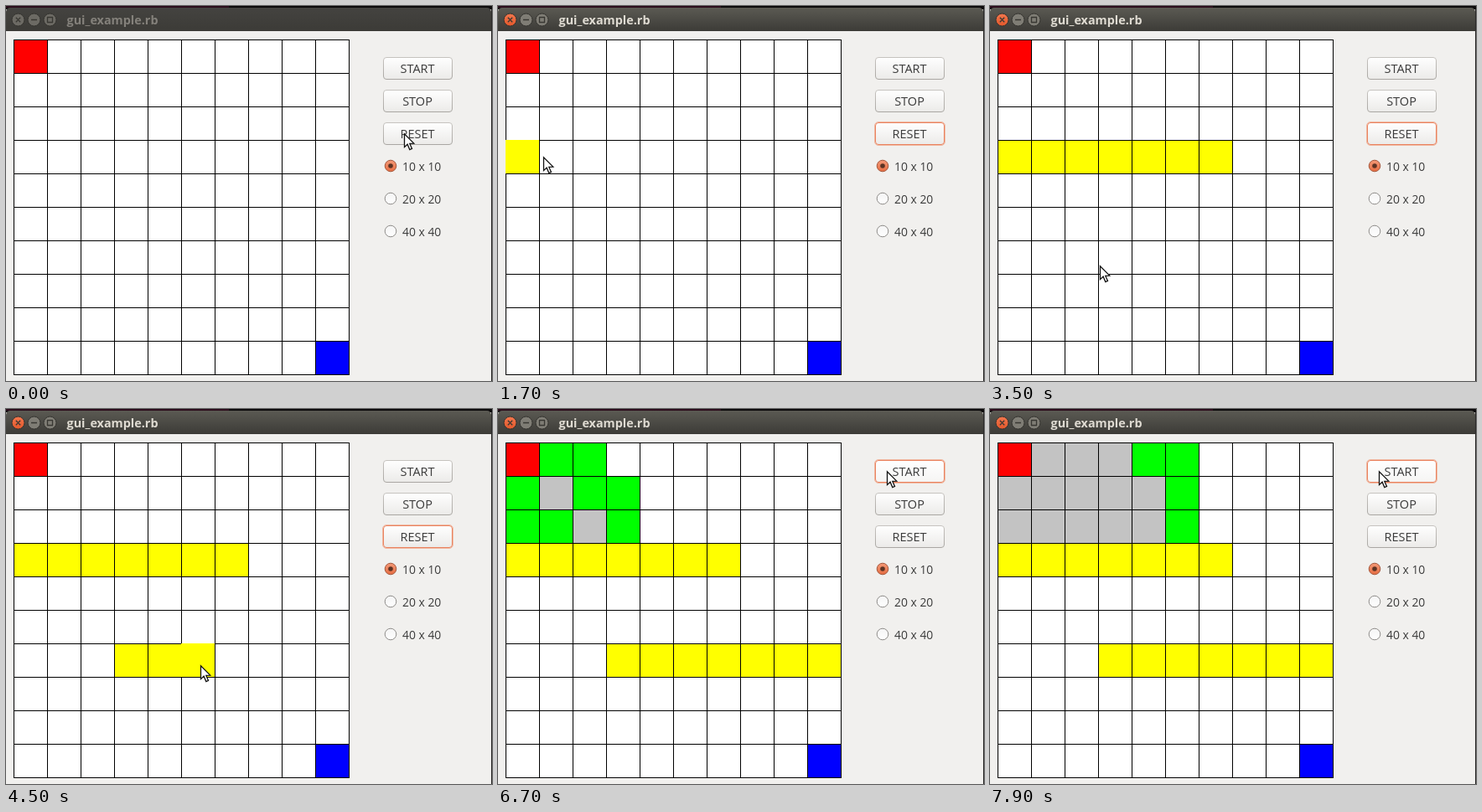
An HTML page with a canvas that plays this animation: 580 by 448 pixels, repeating every 8000 ms.

```html
<!DOCTYPE html>
<html lang="en">
<head>
<meta charset="utf-8">
<title>gui_example.rb</title>
<style>
html, body { margin: 0; width: 100%; height: 100%; overflow: hidden; background: #f1f0ee; }
canvas { display: block; }
</style>
</head>
<body>
<canvas id="stage" width="580" height="448"></canvas>
<script>
const ctx = document.getElementById('stage').getContext('2d');
const LOOP = 8000, STEP = 100;
const CELL = 40, LEFT = 9, TOP = 40, SIZE = 10, GOAL = SIZE * SIZE - 1;
const LAG = 40;
const PRESS = 6500, RELEASE = 6600;
const VISIT_FROM = 6440, VISIT_TIME = 105, REPAINT = 200;
const FONT = '"Open Sans", "Noto Sans", sans-serif';
const INK = '#3b3b3b';

// Pointer way-points: time, x, y
const path = [
  [100, 475, 152], [400, 505, 148], [1000, 103, 203], [1500, 22, 182],
  [1700, 54, 180], [2200, 265, 187], [2600, 249, 265], [2800, 90, 349],
  [3500, 131, 310], [4100, 127, 310], [4500, 232, 306], [4900, 385, 299],
  [5300, 456, 299], [5800, 450, 160], [6200, 464, 74]
];

// Start and end of each wall-painting drag
const drags = [[1500, 2250], [4200, 5000]];
const ACTIVATE = drags[0][0];

function pointerAt(t) {
  const i = path.findIndex(p => p[0] > t);
  if (i === 0) return path[0].slice(1);
  if (i < 0) return path[path.length - 1].slice(1);
  const [t0, x0, y0] = path[i - 1], [t1, x1, y1] = path[i];
  const k = (t - t0) / (t1 - t0);
  return [Math.round(x0 + (x1 - x0) * k), Math.round(y0 + (y1 - y0) * k)];
}

const column = key => key % SIZE;
const row = key => Math.floor(key / SIZE);

function cellAt(t) {
  const [x, y] = pointerAt(t);
  return Math.floor((y - TOP) / CELL) * SIZE + Math.floor((x - LEFT) / CELL);
}

// Walls follow the dragging pointer; the newest one stays fresh until release
function paintedWalls(t) {
  const walls = new Set();
  let fresh = -1;
  for (const [from, to] of drags) {
    if (t < from) continue;
    const last = cellAt(Math.max(from, Math.min(t, to) - LAG));
    for (let key = cellAt(from); key <= last; key++) walls.add(key);
    if (t < to) fresh = last;
  }
  return { walls, fresh };
}

function distance(a, b) {
  const dx = Math.abs(column(a) - column(b)), dy = Math.abs(row(a) - row(b));
  return 10 * Math.max(dx, dy) + 4 * Math.min(dx, dy);
}

function neighbours(key) {
  const list = [];
  for (let x = column(key) - 1; x <= column(key) + 1; x++) {
    for (let y = row(key) - 1; y <= row(key) + 1; y++) {
      if (x >= 0 && y >= 0 && x < SIZE && y < SIZE) list.push(y * SIZE + x);
    }
  }
  return list;
}

// A* from the red cell; ties go to the cell found first
function search(visits, walls) {
  const open = new Map([[0, 0]]), closed = new Set();
  for (let n = 0; n <= visits && open.size; n++) {
    let best, bestCost = Infinity;
    for (const [key, g] of open) {
      const cost = g + distance(key, GOAL);
      if (cost < bestCost) [best, bestCost] = [key, cost];
    }
    const g = open.get(best);
    open.delete(best);
    closed.add(best);
    for (const key of neighbours(best)) {
      if (walls.has(key) || closed.has(key)) continue;
      const next = g + distance(best, key);
      if (!(open.get(key) <= next)) open.set(key, next);
    }
  }
  return { open: [...open.keys()], closed: [...closed] };
}

function rect(x, y, w, h, color) {
  ctx.fillStyle = color;
  ctx.fillRect(x, y, w, h);
}

function shade(y0, y1, ...colors) {
  const g = ctx.createLinearGradient(0, y0, 0, y1);
  colors.forEach((c, i) => g.addColorStop(i / (colors.length - 1), c));
  return g;
}

function stroke(color, width = 1) {
  ctx.strokeStyle = color;
  ctx.lineWidth = width;
  ctx.stroke();
}

function circle(x, y, r, fill, line) {
  ctx.beginPath();
  ctx.arc(x, y, r, 0, Math.PI * 2);
  ctx.fillStyle = fill;
  ctx.fill();
  if (line) stroke(line);
}

function text(str, x, y, font, color, align = 'left') {
  ctx.font = `${font} ${FONT}`;
  ctx.textAlign = align;
  ctx.fillStyle = color;
  ctx.fillText(str, x, y);
}

function drawTitle(active) {
  rect(0, 0, 580, 4, '#0c0a0b');
  rect(0, 0, 266, 2, '#2c0d1c');
  ctx.beginPath();
  ctx.roundRect(0, 2, 579, 28, [5, 5, 0, 0]);
  ctx.fillStyle = active ? shade(2, 30, '#5b5a53', '#3c3b37') : shade(2, 30, '#444340', '#3c3b37');
  ctx.fill();

  const grey = active ? '#7f7d75' : '#6c6a64';
  for (let i = 0; i < 3; i++) {
    const fill = active && i === 0 ? shade(9, 24, '#f2774e', '#e2582b') : grey;
    circle(14.5 + i * 19, 16.5, 7.5, fill, '#34332f');
  }
  ctx.beginPath();
  ctx.moveTo(11.8, 13.8); ctx.lineTo(17.2, 19.2);
  ctx.moveTo(17.2, 13.8); ctx.lineTo(11.8, 19.2);
  ctx.moveTo(30, 16.5); ctx.lineTo(37, 16.5);
  ctx.rect(49.5, 13.5, 6, 6);
  stroke('#383732', 1.3);
  text('gui_example.rb', 72.5, 22, 'bold 14.4px', active ? '#dfdbd2' : '#84817b');
}

function drawButton(label, y, focused, hot) {
  ctx.beginPath();
  ctx.roundRect(450.5, y + 0.5, 82, 26, 3.5);
  ctx.fillStyle = hot ? shade(y, y + 27, '#ffffff', '#f5f4f3') : shade(y, y + 27, '#ffffff', '#ebeae8');
  ctx.fill();
  stroke(focused ? '#e98360' : shade(y, y + 27, '#c6c3bf', '#a9a6a2'));
  if (focused) {
    ctx.beginPath();
    ctx.roundRect(449.5, y - 0.5, 84, 28, 4.5);
    stroke('rgba(240, 119, 70, 0.45)');
  }
  text(label, 491, y + 19, '14.5px', INK, 'center');
}

function drawRadio(n, y, on) {
  const fill = on ? ['#f49a78', '#e56c41'] : ['#f4f4f4', '#ffffff'];
  circle(459, y, 6.8, shade(y - 7, y + 7, ...fill), on ? '#a4573c' : '#8f8d8a');
  if (on) circle(459, y, 2.8, '#5c3324');
  text(`${n} x ${n}`, 473, y + 6, '13.9px', INK);
}

function drawGrid(t) {
  const span = CELL * SIZE + 1;
  const { walls, fresh } = paintedWalls(t);
  const fill = (key, color) =>
    rect(LEFT + column(key) * CELL, TOP + row(key) * CELL, CELL, CELL, color);

  rect(LEFT, TOP, span, span, '#ffffff');
  if (t >= RELEASE) {
    const painted = Math.floor((t - PRESS) / REPAINT) * REPAINT + PRESS;
    const { open, closed } = search(Math.floor((painted - VISIT_FROM) / VISIT_TIME), walls);
    open.forEach(key => fill(key, '#00ff00'));
    closed.forEach(key => fill(key, '#c3c3c3'));
  }
  walls.forEach(key => fill(key, '#ffff00'));
  fill(0, '#ff0000');
  fill(GOAL, '#0000ff');
  for (let i = 0; i <= SIZE; i++) {
    rect(LEFT + i * CELL, TOP, 1, span, '#000000');
    rect(LEFT, TOP + i * CELL, span, 1, '#000000');
  }
  // The cell being painted hides its left and top lines
  if (fresh >= 0) fill(fresh, '#ffff00');
}

function drawPointer(x, y) {
  ctx.save();
  ctx.translate(x + 0.5, y + 0.8);
  ctx.beginPath();
  [[0, 0], [0, 15.8], [3.6, 12.4], [6.3, 18.8], [9, 17.6], [6.3, 11.6], [11.3, 11.3]]
    .forEach(p => ctx.lineTo(...p));
  ctx.closePath();
  ctx.fillStyle = '#ffffff';
  ctx.fill();
  stroke('#111111', 1.3);
  ctx.restore();
}

function draw(t) {
  const active = t >= ACTIVATE;
  const [px, py] = pointerAt(t);
  const focus = !active ? '' : t < PRESS ? 'RESET' : 'START';

  rect(0, 0, 580, 448, '#f1f0ee');
  drawTitle(active);
  rect(579, 4, 1, 444, '#2a2928');
  drawGrid(t);
  ['START', 'STOP', 'RESET'].forEach((label, i) => {
    const y = 61 + i * 39;
    const hot = active && px >= 449 && px < 534 && py >= y && py < y + 27;
    drawButton(label, y, focus === label, hot);
  });
  [10, 20, 40].forEach((n, i) => drawRadio(n, 191 + i * 39, i === 0));
  drawPointer(px, py);
}

const start = performance.now();
function tick() {
  const t = (performance.now() - start) % LOOP;
  draw(Math.floor(t / STEP) * STEP);
  requestAnimationFrame(tick);
}
tick();
</script>
</body>
</html>
```
